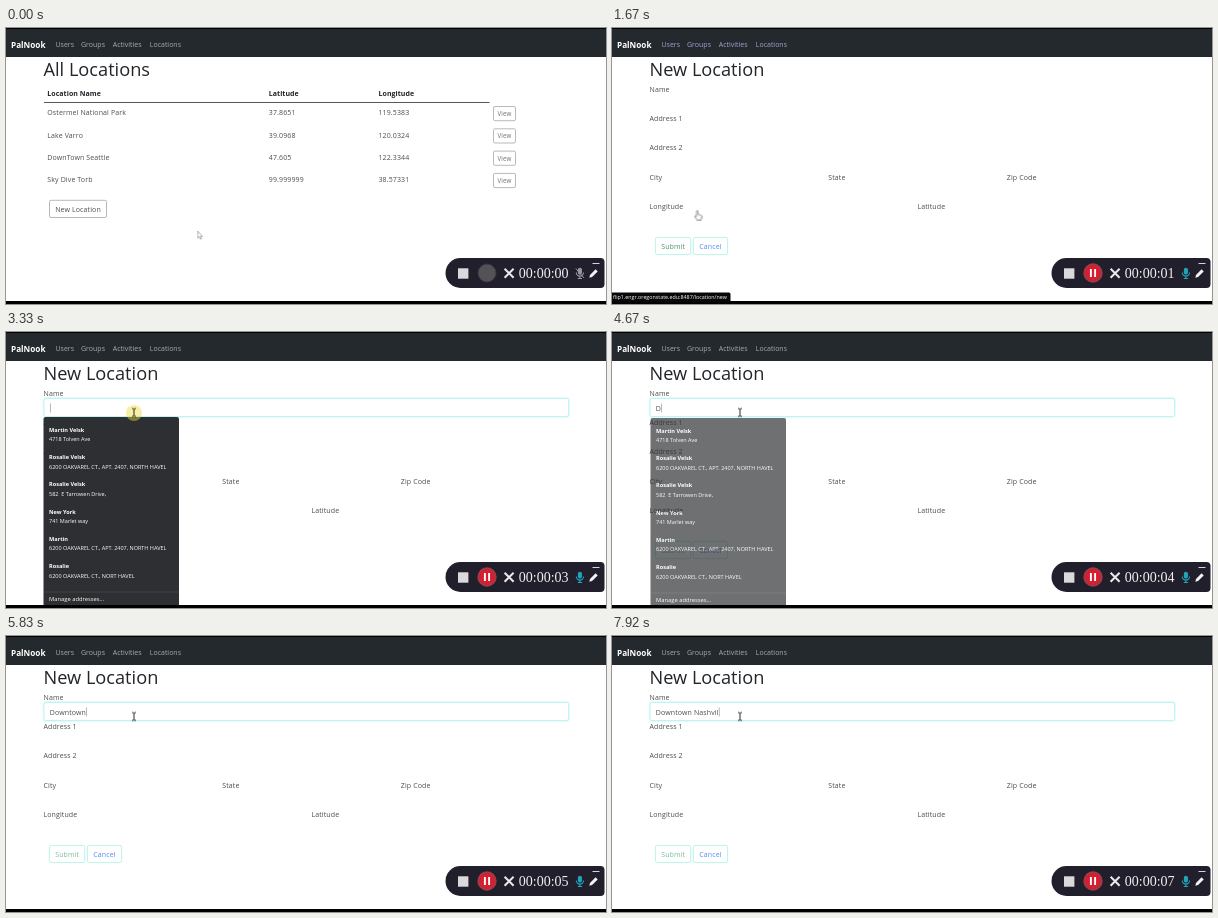
An HTML page for the animation above (8000 ms loop, 600 by 276 pixels).

```html
<!DOCTYPE html>
<html lang="en">
<head>
<meta charset="utf-8">
<title>New location</title>
<style>
  html, body { margin: 0; width: 100%; height: 100%; overflow: hidden; background: #fff; }
  svg { display: block; width: 100%; height: 100%; }
  text { font: 7px "Open Sans", "Noto Sans", sans-serif; letter-spacing: .12px; fill: #4a4d50; white-space: pre; }
  .title { font-size: 18.2px; font-weight: 500; fill: #212529; letter-spacing: 0; }
  .brand { font-size: 8.2px; font-weight: 700; fill: #fff; letter-spacing: 0; }
  .head { font-weight: 700; fill: #212529; letter-spacing: .05px; }
  .mid { text-anchor: middle; }
  .view { font-size: 6.2px; fill: #6f7377; }
  .dark { font-weight: 500; fill: #fff; }
  .url { font-size: 5.35px; fill: #fff; letter-spacing: 0; }
  .clock { font: 14px "Liberation Serif", serif; fill: #f1eff2; letter-spacing: 0; }
  .box { fill: #fff; stroke: #a5a8aa; stroke-width: .8; }
  .option text { font-size: 5.5px; font-weight: 500; fill: #fff; letter-spacing: 0; }
  .option .name { font-size: 5.6px; font-weight: 700; }
  .option .manage { font-size: 5.8px; }
  .nav { font-weight: 500; letter-spacing: 0; fill: #a9acae; }

  .nav, .submit, .cancel, #drop, #ring, #click, #pointer { animation: 8s linear infinite; }
  .nav { animation-name: nav; }
  .submit { animation-name: submit; }
  .cancel { fill: #4f8df5; }
  #drop { animation-name: drop; }
  #ring { animation-name: ring; }
  #click { animation-name: click; }
  #pointer { animation-name: move; animation-timing-function: ease-in-out; }

  @keyframes nav {
    0%, 19.74% { fill: #a9acae; }
    19.75% { fill: #a09cec; }
    22.5%, 100% { fill: #a9acae; }
  }
  @keyframes submit {
    0%, 20.5% { fill: #3f8f68; }
    23%, 100% { fill: #79bd9b; }
  }
  @keyframes drop {
    0%, 39.6% { opacity: 0; transform: none; }
    41.2%, 57.25% { opacity: 1; transform: none; }
    57.5% { transform: translate(1px, 1px); }
    60.9%, 100% { opacity: 0; transform: translate(1px, 1px); }
  }
  @keyframes ring {
    0%, 38.5% { opacity: 0; }
    40.4%, 100% { opacity: 1; }
  }
  @keyframes click {
    0%, 36.5% { opacity: 0; }
    38%, 42% { opacity: 1; }
    46%, 100% { opacity: 0; }
  }
  @keyframes move {
    0%, 1% { transform: translate(191.5px, 203px); }
    8.75%, 26% { transform: translate(84.5px, 182.5px); }
    33.75%, 100% { transform: translate(128px, 80.5px); }
  }
</style>
</head>
<body>
<svg viewBox="0 0 600 276" preserveAspectRatio="none">
  <rect width="600" height="276" fill="#fff"/>
  <rect width="600" height="29" fill="#23292d"/>
  <rect width="600" height="1" fill="#000"/>
  <text class="brand" x="5" y="19.7">PalNook</text>
  <g id="links"></g>

  <g id="list" data-show="0 1580">
    <text class="title" x="37.5" y="48">All Locations</text>
    <path d="M38 74.5H483.5" stroke="#44484b" stroke-width=".9"/>
  </g>

  <g id="form" data-show="1580 8000">
    <text class="title" x="37.5" y="48">New Location</text>
    <g fill="#fff" stroke="#b5f2e6" stroke-width=".9">
      <rect x="43.4" y="209.4" width="35.4" height="17.2" rx="1.8"/>
      <rect x="81.4" y="209.4" width="34.2" height="17.2" rx="1.8"/>
    </g>
    <text class="mid submit" x="61.2" y="220.8">Submit</text>
    <text class="mid cancel" x="98.4" y="220.8">Cancel</text>
    <g id="ring" fill="none">
      <rect x="37.5" y="66" width="525.5" height="19" rx="2.5" stroke="#e2fbfb" stroke-width="1.8"/>
      <rect x="38" y="66.5" width="524.5" height="18" rx="2" stroke="#b4f1f4" stroke-width=".8" fill="#fff"/>
    </g>
    <text id="typed" x="43.8" y="78.7"></text>
    <rect id="caret" y="71.5" width=".7" height="9" fill="#a09694"/>
    <g id="drop">
      <path d="M37.5 273V87a2 2 0 0 1 2-2H171a2 2 0 0 1 2 2V273Z" fill="#2e2f32"/>
      <path d="M38 260H173" stroke="#4a4b4e" stroke-width=".7"/>
      <g class="option" id="options"><text class="manage" x="43" y="269.2">Manage addresses...</text></g>
    </g>
    <circle id="click" cx="128" cy="81" r="8" fill="#f0dc3c" fill-opacity=".45"/>
  </g>

  <rect y="273" width="600" height="3" fill="#000"/>
  <g data-show="920 1830">
    <path d="M0 264.5H117a1.5 1.5 0 0 1 1.5 1.5V274H0Z" fill="#080808"/>
    <text class="url" x="1" y="271.2">flip1.engr.oregonstate.edu:8487/location/new</text>
  </g>

  <g id="recorder">
    <path d="M454.5 230H594.5a4 4 0 0 1 4 4V256a4 4 0 0 1-4 4H454.5a15 15 0 0 1 0-30Z" fill="#221f2c"/>
    <rect x="452" y="240.3" width="10.4" height="10.4" fill="#dcd8db"/>
    <g data-show="0 250">
      <circle cx="481" cy="245" r="9" fill="#545257" stroke="#3b3940"/>
      <g stroke="#9b98a0" fill="#9b98a0"><use href="#mic"/><path d="M569.8 240.5L578 250"/></g>
    </g>
    <g data-show="250 8000">
      <circle cx="481" cy="245" r="8.8" fill="#d51f30" stroke="#a03a48" stroke-width="1.8"/>
      <path d="M478.9 241V249M483.1 241V249" stroke="#fff" stroke-width="1.9"/>
      <g stroke="#20a5be" fill="#20a5be"><use href="#mic"/></g>
    </g>
    <path d="M498.6 240.8L507.6 249.8M507.6 240.8L498.6 249.8" stroke="#ece9ec" stroke-width="2"/>
    <text class="clock" x="512.8" y="250" id="clock">00:00:00</text>
    <path d="M583.3 249.8L584 246.9L589.6 241.3L591.7 243.4L586.1 249.1Z" fill="#f4f2f4"/>
    <path d="M586.5 235.5H593.5" stroke="#d8d5da"/>
  </g>
  <defs>
    <g id="mic" stroke-width="1.1">
      <rect x="572.4" y="240.3" width="3" height="5.8" rx="1.5"/>
      <path d="M570.3 244.5a3.6 3.6 0 0 0 7.2 0M573.9 248.2V250.5M571.8 250.5H576" fill="none"/>
    </g>
  </defs>

  <g id="pointer" stroke-linejoin="round">
    <path id="arrow" data-show="0 600" d="M0 0V7.2L1.7 5.7L2.9 8.2L4 7.7L2.9 5.3H5Z" fill="#fff" stroke="#777" stroke-width=".6"/>
    <path data-show="600 2130" d="M0 .8a.8.8 0 0 1 1.6 0V4L4.6 4.8Q5.3 5 5.2 6L4.6 9.3H.4L-2 5.9Q-1.6 4.9 0 6.2Z" fill="#fff" stroke="#555" stroke-width=".6"/>
    <path data-show="2560 8000" d="M-2 -4Q-.2 -4 0 -3.2Q.2 -4 2 -4M0 -3.2V3.2M-2 4Q-.2 4 0 3.2Q.2 4 2 4" fill="none" stroke="#111" stroke-width=".9"/>
  </g>
</svg>
<script>
  const LOOP = 8000, FOCUS = 3080;
  const PHRASE = 'Downtown Nashvil';
  const KEYS = [4580, 4830, 5000, 5250, 5420, 5500, 5580, 5750,
                6080, 6420, 6580, 6750, 6920, 7000, 7170, 7830];
  const $ = id => document.getElementById(id);
  const add = (id, markup) => $(id).insertAdjacentHTML('beforeend', markup);
  const label = (x, y, text, cls = '') => `<text class="${cls}" x="${x}" y="${y}">${text}</text>`;
  const button = (x, y, w, h) => `<rect class="box" x="${x}" y="${y}" width="${w}" height="${h}" rx="1.5"/>`;

  [[49.5, 'Users'], [75, 'Groups'], [106.8, 'Activities'], [143.8, 'Locations']]
    .forEach(([x, text]) => add('links', label(x, 19, text, 'nav')));

  const columns = [41.3, 262.8, 372.5];
  ['Location Name', 'Latitude', 'Longitude']
    .forEach((text, i) => add('list', label(columns[i], 68, text, 'head')));
  [['Ostermel National Park', '37.8651', '119.5383'],
   ['Lake Varro', '39.0968', '120.0324'],
   ['DownTown Seattle', '47.605', '122.3344'],
   ['Sky Dive Torb', '99.999999', '38.57331']].forEach((row, i) => {
    const y = 87.4 + i * 22.3;
    row.forEach((text, c) => add('list', label(columns[c], y, text)));
    add('list', button(487.5, y - 8.9, 22, 14.2) + label(498.5, y + .7, 'View', 'mid view'));
  });
  add('list', button(43.5, 172.3, 57, 17.2) + label(72, 183.6, 'New Location', 'mid') +
    `<g data-show="640 1580"><rect x="43" y="172" width="58" height="18" rx="2" fill="#212529"/>
     ${label(72, 183.6, 'New Location', 'mid dark')}</g>`);

  const labels = [[37.5, 64, 'Name'], [37.5, 93.3, 'Address 1'], [37.5, 122.4, 'Address 2'],
    [37.5, 151.6, 'City'], [216.3, 151.6, 'State'], [394.8, 151.6, 'Zip Code'],
    [37.5, 180.8, 'Longitude'], [305.5, 180.8, 'Latitude']];
  $('ring').insertAdjacentHTML('beforebegin', labels.map(l => label(...l)).join(''));

  [['Martin Velsk', '4718 Tolven Ave'],
   ['Rosalie Velsk', '6200 OAKVAREL CT., APT. 2407, NORTH HAVEL'],
   ['Rosalie Velsk', '582  E Tarrowen Drive,'],
   ['New York', '741 Marlet way'],
   ['Martin', '6200 OAKVAREL CT., APT. 2407, NORTH HAVEL'],
   ['Rosalie', '6200 OAKVAREL CT., NORT HAVEL']].forEach(([name, address], i) => {
    const y = 99.6 + i * 27.3;
    add('options', label(43, y, name, 'name') + label(43, y + 9.6, address));
  });

  // The arrow returns between the button and the text field.
  const arrow = $('arrow').cloneNode();
  arrow.removeAttribute('id');
  arrow.dataset.show = '2130 2560';
  $('pointer').append(arrow);

  const timed = [...document.querySelectorAll('[data-show]')]
    .map(el => [el, ...el.dataset.show.split(' ').map(Number)]);
  let start;

  function render(now) {
    start ??= now;
    const t = (now - start) % LOOP;
    for (const [el, from, to] of timed)
      el.style.visibility = t >= from && t < to ? 'inherit' : 'hidden';

    const count = KEYS.filter(k => k <= t).length;
    $('typed').textContent = PHRASE.slice(0, count);
    const sinceKey = t - (count ? KEYS[count - 1] : FOCUS);
    $('caret').setAttribute('x', 44 + (count ? $('typed').getComputedTextLength() : 0));
    $('caret').style.visibility = sinceKey >= 0 && sinceKey % 1000 < 500 ? 'inherit' : 'hidden';

    const seconds = Math.max(0, Math.floor((t - 330) / 1000));
    $('clock').textContent = '00:00:0' + seconds;
    requestAnimationFrame(render);
  }
  requestAnimationFrame(render);
</script>
</body>
</html>
```
